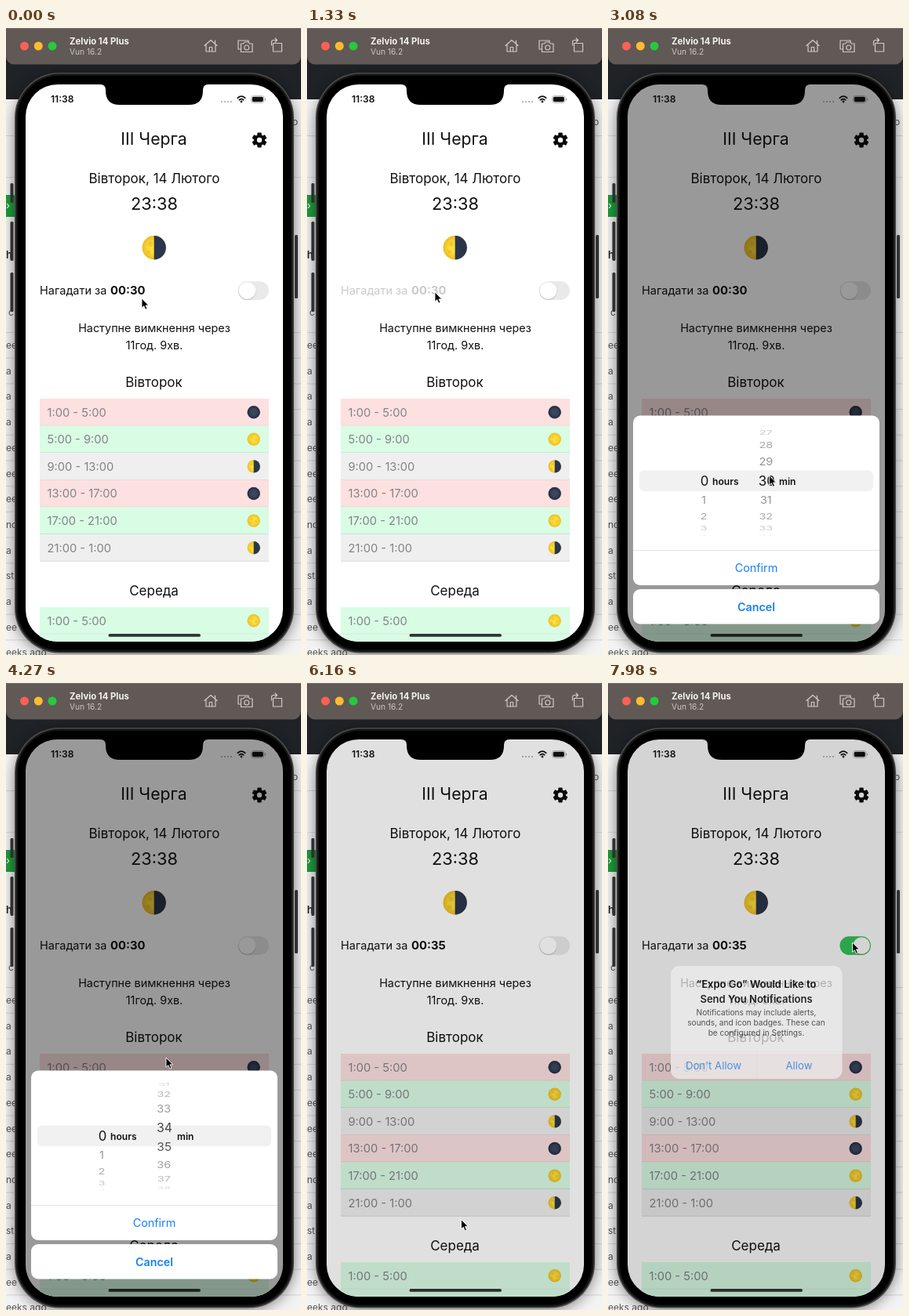
Animation, 376 px wide and 800 px high, one loop 8 s. Source, as an HTML page:

```html
<!DOCTYPE html>
<html lang="uk">
<head>
<meta charset="utf-8">
<style>
html, body { margin: 0; width: 100%; height: 100%; overflow: hidden; background: #eee }
svg { display: block; width: 376px; height: 800px; font-family: Inter, "Noto Sans", sans-serif }
</style>
</head>
<body>
<svg id="stage" viewBox="0 0 376 800"></svg>
<script>
const LOOP = 8000, STEP = 70;
const rect = (x, y, w, h, fill, r = 0, more = '') =>
  `<rect x="${x}" y="${y}" width="${w}" height="${h}" fill="${fill}" rx="${r}" ${more}/>`;
const disc = (x, y, r, fill, more = '') => `<circle cx="${x}" cy="${y}" r="${r}" fill="${fill}" ${more}/>`;
const text = (s, x, y, size, fill = '#111', more = '') =>
  `<text x="${x}" y="${y}" font-size="${size}" fill="${fill}" ${more}>${s}</text>`;
const mid = 'text-anchor="middle"', semi = 'font-weight="600"', bold = 'font-weight="700"';
const line = (d, color, w = 1) => `<path d="${d}" fill="none" stroke="${color}" stroke-width="${w}" stroke-linecap="round" stroke-linejoin="round"/>`;

function moon(x, y, r, phase) {
  const spot = (dx, dy, size) => disc(x + r * dx, y + r * dy, r * size, '#d9a51c', 'opacity=".35"');
  const full = disc(x, y, r, 'url(#gold)') + spot(-.3, -.3, .2) + spot(-.45, .35, .16) + spot(.35, .1, .2);
  if (phase === 'full') return full;
  if (phase === 'new') return disc(x, y, r, 'url(#navy)');
  return full + `<path d="M${x} ${y - r}a${r} ${r} 0 0 1 0 ${2 * r}z" fill="#2b364d"/>`;
}

const kinds = { new: '#fde0e0', full: '#d9fce5', half: '#efefef' };
function row(y, hours, phase) {
  return rect(43, y, 292, 34.6, kinds[phase]) + rect(43, y + 33.8, 292, .8, '#000', 0, 'opacity=".12"') +
    text(hours, 52.5, y + 22.5, 14.7, '#838387') + moon(315.7, y + 17.2, 8.2, phase);
}

function gear(x, y) {
  let s = '';
  for (let i = 0; i < 6; i++) s += rect(-2.7, -9.4, 5.4, 9, '#0b0b0b', 1, `transform="rotate(${i * 60})"`);
  return `<g transform="translate(${x} ${y})">${s}${disc(0, 0, 7.1, '#0b0b0b')}${disc(0, 0, 3.2, '#fff')}</g>`;
}

function desktop() {
  const ages = ['ee', 'a', 'a', 'a', 'ee', 'ee', 'ee', 'no', 'a', 'st', 'a', 'ee', 'eeks ago'];
  let s = rect(0, 0, 376, 800, '#f3f3f3') + rect(0, 30, 376, 61, '#1f2226') +
    rect(0, 137, 376, 1, '#d4d4d4') + rect(0, 190, 376, 1, '#dcdcdc') +
    rect(0, 213, 12, 28, '#1f9d3c') + text('›', 0, 231, 13, '#fff') +
    text('h', 0, 294, 13, '#222', semi) + text('c', 3, 367, 12, '#555') + text('o', 365, 124, 12, '#555');
  ages.forEach((a, i) => {
    const y = 409 + i * 32.7;
    s += rect(0, y - 21, 376, 1, '#d5d5d5') + text(a, 0, y, 12, '#555');
  });
  return s;
}

function toolbar() {
  const c = '#d0ccca';
  return rect(0, -12, 376, 58.5, '#605955', 10) + rect(0, 0, 376, 1, '#77706c') +
    disc(23.5, 23, 5.5, '#fe5f57') + disc(41.3, 23, 5.5, '#febc2e') + disc(59, 23, 5.5, '#28c840') +
    text('Zelvio 14 Plus', 81, 21, 11.3, '#f4f2f1', bold) + text('Vun 16.2', 81, 34, 10.2, '#cbc7c4') +
    line('M253 22.5L261 15.5L269 22.5M255 21.5V30H267V21.5M259.3 29.5V24.5H262.7V29.5M266.5 16V20', c, 1.2) +
    line('M298.5 27H296V16H309V18M299.5 20H302.5L304 18H309L310.5 20H314V30.5H299.5Z', c, 1.2) +
    `<circle cx="306.8" cy="25" r="3" fill="none" stroke="${c}" stroke-width="1.1"/>` +
    line('M340.5 19.5H351.5V30H340.5ZM338.5 22V18Q338.5 15.5 341 15.5H345M343 13L345.5 15.5L343 18', c, 1.2);
}

function phone() {
  const button = (x, y, h) => rect(x, y, 4, h, '#303030', 1.5);
  return rect(11, 62, 356, 738, '#000', 60, 'opacity=".5" filter="url(#blur)"') +
    button(5.5, 198, 25) + button(5.5, 247, 50) + button(5.5, 312, 50) + button(368, 264, 81) +
    rect(11, 57, 356, 740.5, '#4b4a49', 57) + rect(12.5, 58.5, 353, 737.5, '#161616', 56) +
    rect(15, 61, 348, 732.5, '#000', 53);
}

function page() {
  const tue = [['1:00 - 5:00', 'new'], ['5:00 - 9:00', 'full'], ['9:00 - 13:00', 'half'],
    ['13:00 - 17:00', 'new'], ['17:00 - 21:00', 'full'], ['21:00 - 1:00', 'half']];
  let s = rect(24, 70, 330, 716, '#fff') +
    text('11:38', 57, 95, 12.1, '#111', semi) +
    [275, 279, 283, 287].map(x => disc(x, 94, 1.1, '#aaa')).join('') +
    line('M295.2 89.3Q300 85 304.8 89.3M297.2 91.8Q300 89.4 302.8 91.8', '#111', 1.7) + disc(300, 94, 1.4, '#111') +
    rect(312.5, 86.5, 16.5, 9, 'none', 2.8, 'stroke="#aaa" stroke-width=".8"') + rect(313.7, 87.7, 14.1, 6.6, '#111', 1.7) +
    rect(330, 89.5, 1.2, 3, '#aaa', .6) +
    text('III Черга', 188.5, 148.5, 21.2, '#111', mid) + gear(323, 143) +
    text('Вівторок, 14 Лютого', 189, 197.5, 17, '#111', mid) + text('23:38', 189, 231.5, 21.8, '#111', mid) +
    moon(188.7, 280.3, 15.2, 'half') +
    `<g id="remind">${text('Нагадати за', 43, 339.5, 14.5)}<text id="clock" x="133" y="339.5" font-size="14.8" fill="#111" font-weight="700"></text></g>` +
    rect(295.5, 323.3, 39.5, 23.6, '#e9e9ea', 11.8) + rect(295.5, 323.3, 39.5, 23.6, '#34c759', 11.8, 'id="on"') +
    `<g id="knob">${disc(307.5, 336.2, 11, '#000', 'opacity=".14"')}${disc(307.5, 335.1, 10.7, '#fff')}</g>` +
    text('Наступне вимкнення через', 189, 388, 14.4, '#111', mid) + text('11год. 9хв.', 189, 409.5, 14.4, '#111', mid) +
    text('Вівторок', 188.5, 458, 17, '#111', mid) + text('Середа', 188.5, 724, 17, '#111', mid);
  tue.forEach(([h, p], i) => s += row(473 + i * 34.6, h, p));
  return s + row(739, '1:00 - 5:00', 'full') + row(773.6, '5:00 - 9:00', 'full');
}

function sheet() {
  return `<g id="sheet">` + rect(32, 494.5, 314, 216.5, '#fff', 9) + rect(32, 716, 314, 44.5, '#fff', 9) +
    rect(40, 564.5, 298, 26.5, '#f1f1f2', 6) + rect(32, 666, 314, .8, '#dcdcdf') +
    `<g id="hours"></g><g id="mins"></g>` +
    text('hours', 133, 583, 12.1, '#111', semi) + text('min', 218, 583, 12.1, '#111', semi) +
    text('Confirm', 189, 694, 14.4, '#1580f5', mid) + text('Cancel', 189, 744, 14.3, '#1580f5', mid + ' ' + semi) + `</g>`;
}

function alertBox() {
  const blue = '#2f86ea';
  return `<g id="alert">` + rect(80, 361, 218.5, 144, '#f0f0f0', 11, 'opacity=".88"') +
    rect(80, 470.5, 218.5, .6, '#999', 0, 'opacity=".15"') + rect(189, 470.5, .6, 34.5, '#999', 0, 'opacity=".15"') +
    text('“Expo Go” Would Like to', 189, 389, 13, '#000', mid + ' ' + semi) +
    text('Send You Notifications', 189, 407.5, 13, '#000', mid + ' ' + semi) +
    ['Notifications may include alerts,', 'sounds, and icon badges. These can', 'be configured in Settings.']
      .map((l, i) => text(l, 189, 424 + i * 13, 10.1, '#333', mid)).join('') +
    text("Don't Allow", 134.5, 492.5, 13.2, blue, mid) + text('Allow', 243.5, 492.5, 13.2, blue, mid) + `</g>`;
}

const stage = document.getElementById('stage');
stage.innerHTML = `<defs>
  <filter id="blur" x="-20%" y="-20%" width="140%" height="140%"><feGaussianBlur stdDeviation="9"/></filter>
  <radialGradient id="gold"><stop offset=".4" stop-color="#ffdf3c"/><stop offset="1" stop-color="#edbd22"/></radialGradient>
  <radialGradient id="navy"><stop offset=".4" stop-color="#3b475f"/><stop offset="1" stop-color="#232c42"/></radialGradient>
  <clipPath id="screen"><rect x="25" y="72" width="328" height="711" rx="41"/></clipPath></defs>` +
  desktop() + phone() +
  `<g clip-path="url(#screen)">${page()}${rect(24, 70, 330, 716, '#000', 0, 'id="shade"')}${sheet()}${alertBox()}` +
  rect(130.5, 773, 117.5, 3.8, '#000', 1.9, 'opacity=".78"') + `</g>` +
  `<path d="M120 70V72Q127 72 127 79V80Q127 98 145 98H233Q251 98 251 80V79Q251 72 258 72V70Z"/>` +
  toolbar() +
  `<path id="cursor" d="M0 0V12.2L2.8 9.7L4.8 14.2L7 13.2L5 8.9H8.8Z" fill="#000" stroke="#fff" stroke-width=".9"/>`;
const $ = id => document.getElementById(id);

// Eased values between [time, ...values] stops.
function track(t, stops) {
  let i = 0;
  while (i < stops.length - 1 && t >= stops[i + 1][0]) i++;
  const a = stops[i], b = stops[i + 1] || a;
  let p = b === a ? 0 : Math.max(0, (t - a[0]) / (b[0] - a[0]));
  p = p * p * (3 - 2 * p);
  return a.slice(1).map((v, k) => v + (b[k + 1] - v) * p);
}
const ramp = (t, from, length) => Math.min(1, Math.max(0, (t - from) / length));

function wheel(x, value, min, max) {
  const R = 70, turn = 20.3 * Math.PI / 180;
  let s = '';
  for (let n = Math.max(min, Math.ceil(value - 4)); n <= Math.min(max, value + 4); n++) {
    const d = n - value, c = Math.cos(d * turn), near = Math.max(0, 1 - Math.abs(d));
    const size = 14.5 + 2.3 * near, alpha = near + (1 - near) * .48 * c;
    s += `<g transform="translate(${x + near} ${577.7 + R * Math.sin(d * turn)}) scale(1 ${c})">` +
      text(n, 0, size * .36, size, '#111', `${mid} opacity="${alpha}"`) + `</g>`;
  }
  return s;
}

const cursorPath = [[0, 173, 345], [200, 173, 345], [840, 163, 337], [2000, 163, 337], [2800, 205.5, 571],
  [3350, 205.5, 571], [4050, 204, 478], [4450, 204, 478], [5300, 196.5, 684.5], [6160, 196.5, 684.5], [6650, 311.5, 331]];

function draw(t) {
  const [x, y] = track(t, cursorPath);
  $('cursor').setAttribute('transform', `translate(${x} ${y})`);
  $('remind').setAttribute('opacity', track(t, [[980, 1], [1120, .22], [1330, .22], [1580, 1]])[0]);
  $('clock').textContent = t < 5950 ? '00:30' : '00:35';

  const open = track(t, [[1400, 0], [1700, 1], [5950, 1], [6250, 0]])[0];
  const dim = .4 * (ramp(t, 1400, 300) - ramp(t, 5950, 300));
  const pop = ramp(t, 7820, 160);
  $('shade').setAttribute('opacity', dim + .17 * pop);
  $('sheet').setAttribute('transform', `translate(0 ${711 * (1 - open)})`);
  $('hours').innerHTML = wheel(122, 0, 0, 23);
  $('mins').innerHTML = wheel(201.3, track(t, [[3350, 30], [4050, 33.9], [4500, 35]])[0], 0, 59);

  const on = track(t, [[7350, 0], [7600, 1]])[0];
  $('on').setAttribute('opacity', on);
  $('knob').setAttribute('transform', `translate(${15.7 * on} 0)`);

  const s = 1.14 - .14 * pop;
  $('alert').setAttribute('opacity', .82 * pop);
  $('alert').setAttribute('transform', `translate(189 433) scale(${s}) translate(-189 -433)`);
}

function tick() {
  const t = performance.now() % LOOP;
  draw(Math.floor(t / STEP) * STEP);
  requestAnimationFrame(tick);
}
tick();
</script>
</body>
</html>
```
